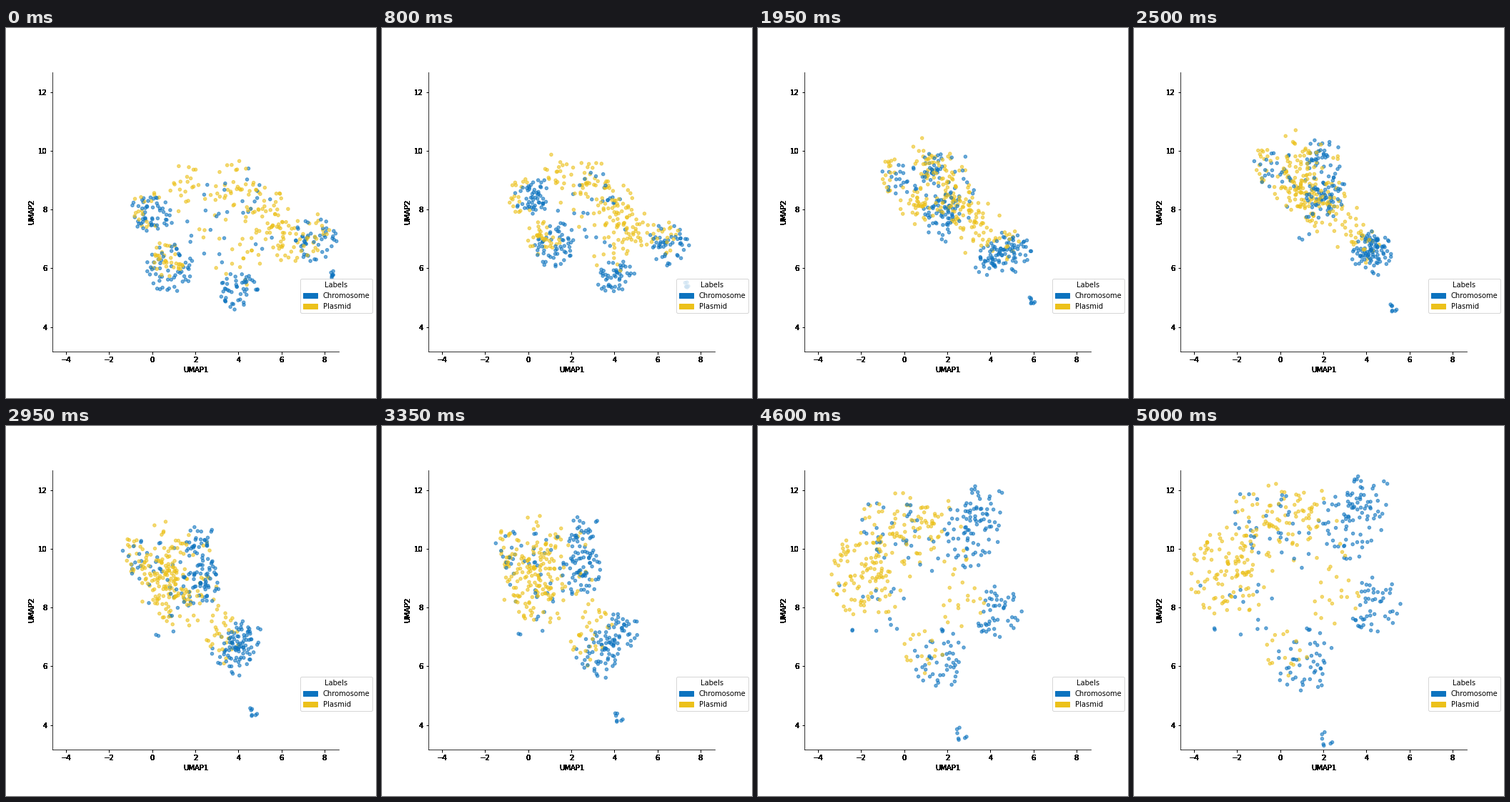
A matplotlib script for the animation above (5.05 s loop, 518x518 px).

```python
import numpy as np
import matplotlib.pyplot as plt
from matplotlib.animation import FuncAnimation
from matplotlib.patches import Patch

SIZE, DPI = 518, 72
FRAMES, STEP = 101, 50
BLUE, YELLOW = "#0C73BF", "#ECC11A"

rng = np.random.default_rng(3)


def disc(n, centre, radius):
    """Random points in a slightly flat ellipse around a complex centre."""
    r = radius * np.sqrt(rng.random(n))
    a = 2 * np.pi * rng.random(n)
    return np.column_stack([centre.real + r * np.cos(a),
                            centre.imag + 0.8 * r * np.sin(a)])


def drift(color, n, start, end, spread=0.8, reach=1.1):
    """One cloud of dots that moves from start to end."""
    return disc(n, start, spread), disc(n, end, reach), [color] * n


clouds = [
    drift(BLUE, 30, -0.3 + 7.9j, 4.2 + 11.8j),
    drift(BLUE, 24, 0.2 + 7.8j, -0.7 + 11.1j, reach=1.6),
    drift(BLUE, 56, 0.8 + 6.0j, 3.4 + 10.8j, 1.1, 1.5),
    drift(BLUE, 16, 2.8 + 7.6j, 1.3 + 10.6j, 1.9, 1.9),
    drift(BLUE, 14, 4.5 + 8.0j, -1.8 + 8.5j, 1.8, 2.0),
    drift(BLUE, 48, 4.0 + 5.2j, 4.4 + 8.1j, 0.9, 1.2),
    drift(BLUE, 48, 7.6 + 7.0j, 1.1 + 6.2j, 1.0, 1.4),
    drift(BLUE, 7, 8.4 + 5.8j, 2.2 + 3.5j, 0.2, 0.35),
    drift(YELLOW, 18, -0.2 + 8.0j, -1.3 + 11.0j),
    drift(YELLOW, 36, 0.7 + 6.3j, 0.5 + 11.0j, reach=1.3),
    drift(YELLOW, 18, 1.5 + 8.9j, 0.2 + 11.2j, reach=1.4),
    drift(YELLOW, 26, 3.9 + 8.9j, -2.4 + 9.8j, 1.0, 1.2),
    drift(YELLOW, 50, 5.2 + 7.8j, -2.7 + 9.1j, 1.2, 1.7),
    drift(YELLOW, 34, 6.5 + 6.9j, -2.2 + 9.0j, 1.0, 2.0),
    drift(YELLOW, 16, 7.6 + 7.2j, 0.4 + 6.4j),
    drift(YELLOW, 16, 3.9 + 6.2j, 2.6 + 8.2j, 1.1),
    drift(YELLOW, 14, 2.5 + 8.0j, 1.8 + 10.7j, 1.4, 1.9),
]
start, end, colors = (np.concatenate(part) for part in zip(*clouds))
order = rng.permutation(len(start))
start, end, colors = start[order], end[order], colors[order]

plt.rcParams.update({"font.family": "DejaVu Sans", "font.size": 10})
fig = plt.figure(figsize=(SIZE / DPI, SIZE / DPI), dpi=DPI, facecolor="white")
ax = fig.add_axes([0.125, 0.125, 0.775, 0.755])
ax.set(xlim=(-4.64, 8.67), ylim=(3.155, 12.665),
       xlabel="UMAP1", ylabel="UMAP2",
       xticks=range(-4, 9, 2), yticks=range(4, 13, 2))
ax.tick_params(width=1)
ax.spines[["top", "right"]].set_visible(False)

dots = ax.scatter(*start.T, s=20, c=colors, alpha=0.6, linewidths=1)
ax.legend(handles=[Patch(color=BLUE, label="Chromosome"),
                   Patch(color=YELLOW, label="Plasmid")],
          title="Labels", loc="center right", bbox_to_anchor=(1.13, 0.2))


def overprint(label, times=16):
    """Stack copies of a label so its soft edges turn dark."""
    x, y = label.get_position()
    for _ in range(times):
        fig.text(x, y, label.get_text(), transform=label.get_transform(),
                 ha=label.get_ha(), va=label.get_va(),
                 rotation=label.get_rotation(),
                 rotation_mode=label.get_rotation_mode())


fig.canvas.draw()
for label in [*ax.get_xticklabels(), *ax.get_yticklabels(),
              ax.xaxis.label, ax.yaxis.label]:
    overprint(label)


def update(i):
    t = i / (FRAMES - 1)
    dots.set_offsets(start + (end - start) * t)
    return (dots,)


anim = FuncAnimation(fig, update, frames=FRAMES, interval=STEP, repeat=True,
                     repeat_delay=0, blit=False)
plt.show()
```
